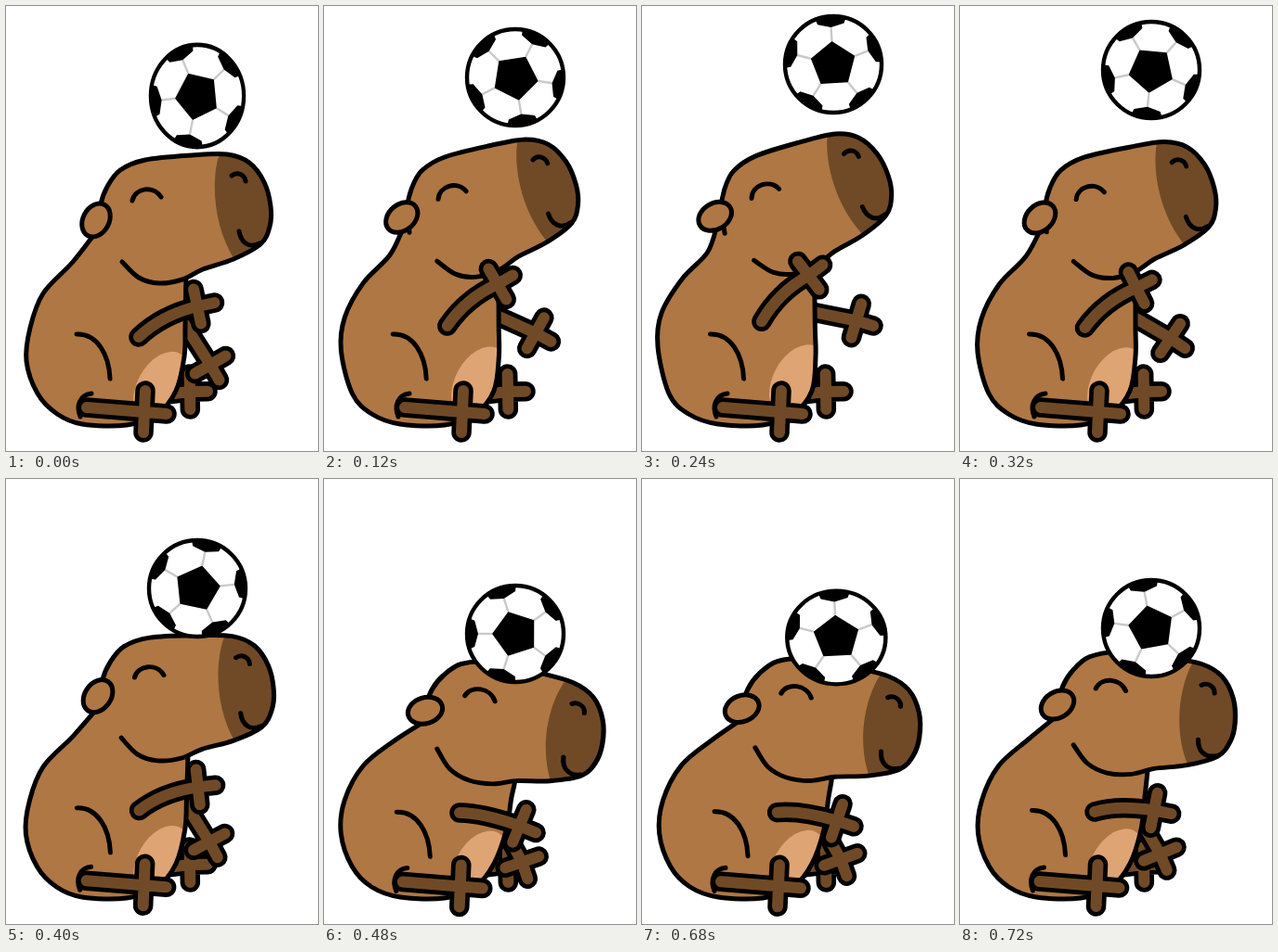
An HTML page that plays this animation: 336x480 px, repeating every 800 ms.

```html
<!DOCTYPE html>
<html lang="en">
<head>
<meta charset="utf-8">
<title>Capybara heading a ball</title>
<style>
  html, body { margin: 0; width: 100%; height: 100%; overflow: hidden; background: #fff; }
  svg { display: block; width: 100vw; height: 100vh; }
  .line { fill: none; stroke: #000; stroke-width: 5; stroke-linecap: round; stroke-linejoin: round; }
  .skin { fill: #af7744; }
  .rim, .limb { fill: none; stroke: #000; stroke-width: 21.5; stroke-linecap: round; stroke-linejoin: round; }
  .limb { stroke: #704a26; stroke-width: 12; }
</style>
</head>
<body>
<svg viewBox="0 0 336 480" xmlns="http://www.w3.org/2000/svg">
  <defs>
    <clipPath id="bodyClip"><path id="bodyMask"/></clipPath>
    <clipPath id="headClip"><path id="headMask"/></clipPath>
    <clipPath id="ballClip"><circle r="52"/></clipPath>
  </defs>
  <g id="backFoot"></g>
  <g id="farArm"></g>
  <path id="body" class="skin"/>
  <g clip-path="url(#bodyClip)">
    <ellipse id="belly" rx="27" ry="42" fill="#dfa474"/>
  </g>
  <path id="bodyLine" class="line"/>
  <path id="haunch" class="line" d="M0 0C22 -1 35 22 36 48"/>
  <g id="head">
    <path id="face" class="skin"/>
    <g clip-path="url(#headClip)">
      <path fill="#704a26" d="M229 150V162C221 190 223 238 247 275L300 290V150Z"/>
    </g>
    <path id="faceLine" class="line"/>
    <path class="line" d="M136 210C139 196 159 193 167 206M243 183C249 178 257 182 258 189M251 243C253 255 262 262 273 256"/>
  </g>
  <ellipse id="ear" class="line skin" rx="14" ry="19"/>
  <g id="nearArm"></g>
  <g id="leg"></g>
  <g id="ball">
    <circle r="52" fill="#fff"/>
    <g clip-path="url(#ballClip)">
      <path id="seams" fill="none" stroke="#c9c9c9" stroke-width="2.4"/>
      <path id="patches"/>
    </g>
    <circle r="52" class="line" style="stroke-width:4.4"/>
  </g>
</svg>
<script>
const $ = id => document.getElementById(id);
const LOOP = 800;
const steps = [0, 120, 160, 200, 240, 320, 360, 400, 480, 600, 680, 720];

// time, lean (-1 stretched, 0 at rest, 1 crouched), ball height, ball squash
const beats = [
  [0, 0, 97, -.6], [120, -.6, 77, 0], [200, -1, 60, 0], [320, -.5, 69, 0],
  [480, .75, 167, 0], [600, 1, 191, 1], [720, .5, 161, 0], [LOOP, 0, 97, -.6]
];

// Each part when stretched, at rest and crouched
const poses = {
  head: [[125, 191, -14], [150, 197, 0], [176, 236, 23]],           // eye x, y, tilt
  ear: [[75, 226, 65], [97, 231, 28], [113, 256, 88]],              // x, y, tilt
  back: [[70, 264, 44, 291, 16], [72, 276, 40, 310, 22], [76, 285, 43, 309, 17]], // shoulder, middle, left edge
  front: [[184, 278, 186], [194, 285, 192], [211, 330, 198]],       // chest x, y, belly x
  nearArm: [[126, 337, 174, 284, -42], [143, 357, 206, 324, -12], [147, 361, 212, 391, 34]], // start, hand, tilt
  farArm: [[180, 327, 233, 330, 8], [192, 343, 220, 387, 60], [198, 395, 211, 422, 75]]
};

const skull = [[100, 241], [102, 214], [109, 195], [123, 177], [150, 166], [200, 161], [238, 160], [262, 169],
  [278, 190], [285, 216], [284, 238], [274, 257], [245, 273], [212, 284], [190, 295], [165, 299], [143, 293], [125, 276]];

const mix = (a, b, u) => a.map((v, i) => v + (b[i] - v) * u);
const pair = p => p.map(n => n.toFixed(2)).join(' ');
const poly = pts => 'M' + pts.map(pair).join('L') + 'Z';
const polar = (r, deg) => [r * Math.cos(deg * Math.PI / 180), r * Math.sin(deg * Math.PI / 180)];
const place = (id, value) => $(id).setAttribute('transform', value);

function setPath(d, ...ids) {
  for (const id of ids) $(id).setAttribute('d', d);
}

// Smooth open curve through points
function curve(pts) {
  let d = 'M' + pair(pts[0]);
  for (let i = 0; i < pts.length - 1; i++) {
    const b = pts[i], c = pts[i + 1], a = pts[i - 1] || b, e = pts[i + 2] || c;
    const out = [b[0] + (c[0] - a[0]) / 6, b[1] + (c[1] - a[1]) / 6];
    const into = [c[0] - (e[0] - b[0]) / 6, c[1] - (e[1] - b[1]) / 6];
    d += 'C' + [out, into, c].map(pair).join(' ');
  }
  return d;
}

function addLimb(id, d = '') {
  $(id).innerHTML = `<path class="rim" d="${d}"/><path class="limb" d="${d}"/>`;
}

function toes(x, y, tilt) {
  return [-90, 0, 90].map(a => `M${pair([x, y])}l${pair(polar(19, a + tilt))}`).join('');
}

function drawArm(id, [x, y, hx, hy, tilt], bend) {
  const elbow = [(x + hx) / 2 - bend, (y + hy) / 2 - bend];
  const d = `M${pair([x, y])}Q${pair(elbow)} ${pair([hx, hy])}` + toes(hx, hy, tilt);
  for (const path of $(id).children) path.setAttribute('d', d);
}

function drawBody(ear, [sx, sy, mx, my, left], [fx, fy, bx]) {
  setPath(curve([
    [ear[0] + 2, ear[1] + 10], [sx, sy], [mx, my], [left + 4, my + 37], [left, my + 73],
    [left + 12, 418], [left + 33, 440], [82, 451], [130, 452], [163, 440], [183, 415],
    [bx, 378], [(bx + fx) / 2, 345], [fx, fy], [fx, fy - 35]
  ]), 'body', 'bodyMask', 'bodyLine');
}

function drawBall(t, y, squash) {
  const turn = t / LOOP;
  const spin = 30 - 216 * turn + 14 * Math.sin(2 * Math.PI * turn);
  const core = [];
  let seams = '', patches = '';
  for (let i = 0; i < 5; i++) {
    const a = spin + i * 72;
    const tip = polar(25, a), joint = polar(40, a);
    core.push(tip);
    seams += `M${pair(tip)}L${pair(joint)}`;
    patches += poly([joint, polar(46, a - 18), polar(60, a - 19), polar(60, a + 19), polar(46, a + 18)]);
  }
  setPath(seams, 'seams');
  setPath(patches + poly(core), 'patches');
  place('ball', `translate(${206 + 10 * Math.max(squash, 0)} ${y}) scale(${1 + .06 * squash} ${1 - .1 * squash})`);
}

function draw(t) {
  const i = beats.findIndex(b => b[0] > t);
  const from = beats[i - 1], to = beats[i];
  const [, lean, ballY, squash] = mix(from, to, (t - from[0]) / (to[0] - from[0]));
  const down = Math.max(lean, 0);
  const part = name => mix(poses[name][1], poses[name][lean < 0 ? 0 : 2], Math.abs(lean));

  const [x, y, tilt] = part('head'), ear = part('ear');
  place('head', `translate(${x} ${y}) rotate(${tilt}) scale(${1 + .07 * down} ${1 - .05 * down}) translate(-150 -197)`);
  place('ear', `translate(${ear[0]} ${ear[1]}) rotate(${ear[2]})`);
  place('haunch', `translate(${76 + 3 * lean} ${354 + 7 * down})`);
  place('belly', `translate(168 ${412 + 9 * lean}) rotate(28)`);
  place('leg', `translate(${-3 * down} ${2 * down})`);
  drawBody(ear, part('back'), part('front'));
  drawArm('nearArm', part('nearArm'), 7);
  drawArm('farArm', part('farArm'), 0);
  drawBall(t, ballY, squash);
}

setPath(curve(skull), 'face', 'headMask', 'faceLine');
addLimb('nearArm');
addLimb('farArm');
addLimb('backFoot', 'M165 420L198 416' + toes(198, 416, -1));
addLimb('leg', 'M87 433L149 438M150 415L148 460M149 438L173 440');
$('leg').innerHTML += '<path class="line" d="M92 418C80 419 75 431 80 443"/>';

let shown = -1;
function tick() {
  const now = performance.now() % LOOP;
  const t = steps.filter(s => s <= now).pop();
  if (t !== shown) draw(shown = t);
  requestAnimationFrame(tick);
}
tick();
</script>
</body>
</html>
```
